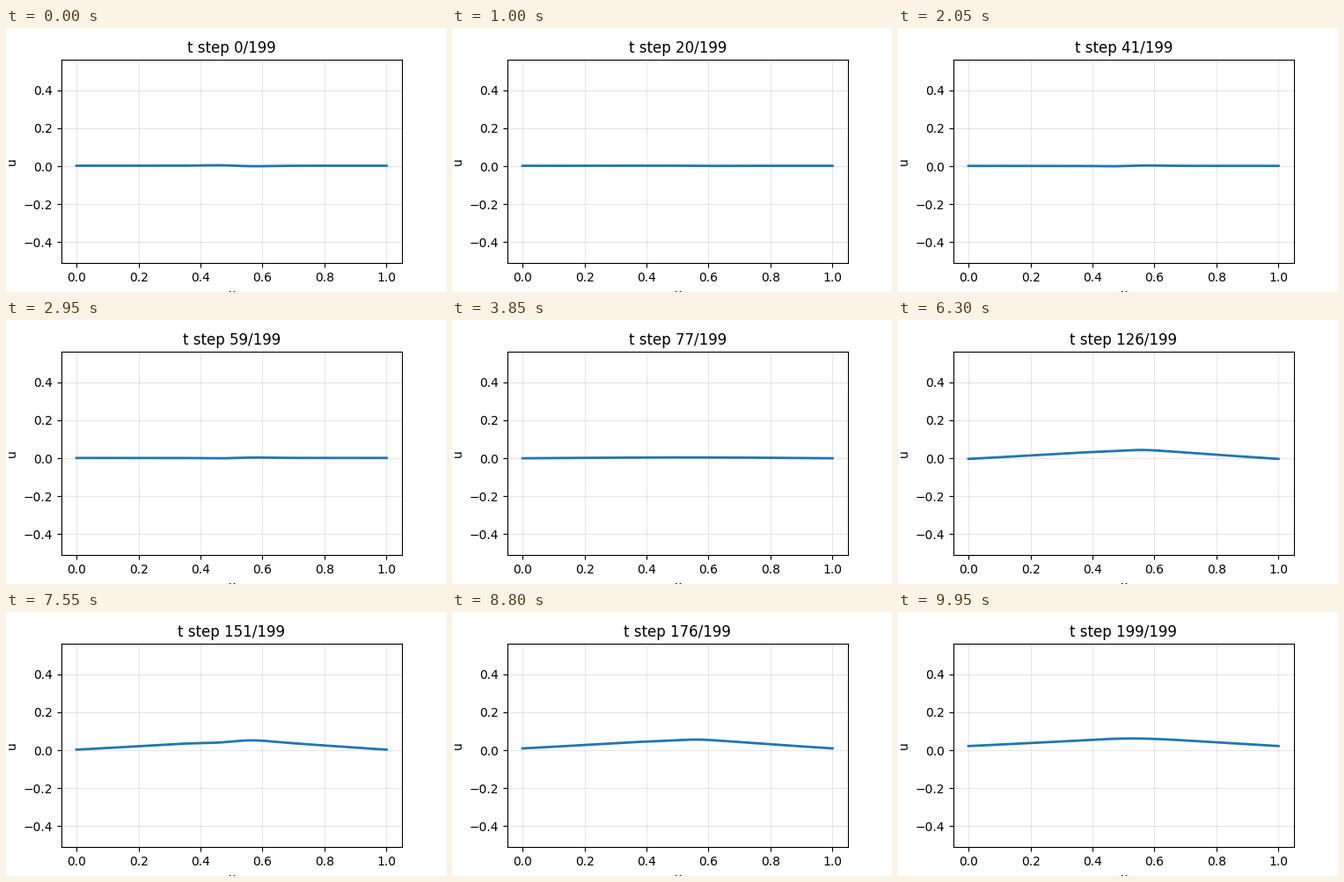
Write a matplotlib script that moves like this. It is 500 by 300 pixels and loops after 10 s.

```python
import numpy as np
import matplotlib.pyplot as plt
from matplotlib.animation import FuncAnimation

STEPS = 200
PERIOD = 100   # steps per ripple swing
ONSET = 88     # step at which the hump emerges
PEAK = 0.54    # x of the hump


def hump(x, w):
    """Rounded tent: 1 at the peak, 0 at both ends."""
    side = np.where(x < PEAK, PEAK, 1 - PEAK)
    drop = (np.hypot(x - PEAK, w) - w) / (np.hypot(side, w) - w)
    return np.clip(1 - drop, 0, 1) ** 1.08


def ripple(x):
    """Up on the left of the middle, down on the right."""
    z = (x - 0.515) / 0.065
    return -z * np.exp(0.5 - z ** 2 / 2)


def profile(x, n):
    grown = 1 / (1 + np.exp(-(n - ONSET) / 5))
    lift = np.exp((n - STEPS + 1) / 5)
    base = (0.0025 - 2e-5 * n - 0.014 * grown
            + 0.00028 * max(0, n - ONSET) + 0.0064 * lift)
    height = 0.045 * grown - 0.005 * lift
    swing = 0.0025 * np.cos(2 * np.pi * n / PERIOD) - 0.002 * grown
    width = 0.09 + 0.25 * (1 - grown)
    return base + height * hump(x, width) + swing * ripple(x)


x = np.linspace(0, 1, 201)

fig, ax = plt.subplots(figsize=(5, 3), dpi=100)
line, = ax.plot(x, profile(x, 0), lw=2)
ax.set_xlim(-0.05, 1.05)
ax.set_ylim(-0.51, 0.5615)
ax.set_xlabel("x")
ax.set_ylabel("u")
ax.grid(alpha=0.3)
title = ax.set_title("")


def update(n):
    line.set_ydata(profile(x, n))
    title.set_text(f"t step {n}/{STEPS - 1}")
    return line, title


anim = FuncAnimation(fig, update, frames=STEPS, interval=50,
                     repeat=True, repeat_delay=0)
plt.show()
```
